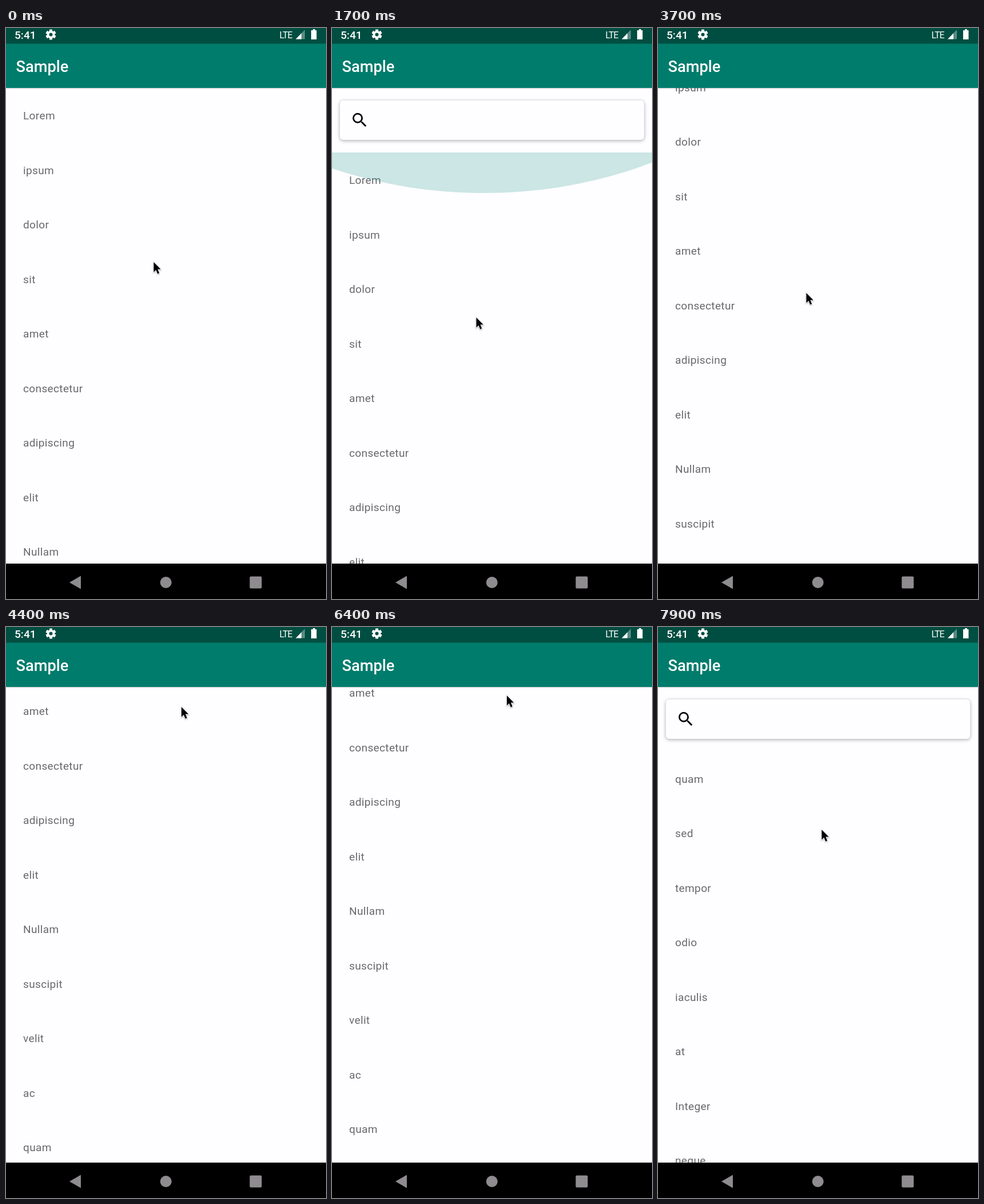
Recreate the animation shown at these times as an HTML page. Size 560x1000 px, loop 8 s.

```html
<!DOCTYPE html>
<html lang="en">
<head>
<meta charset="utf-8">
<title>Quick return search bar</title>
<style>
  html, body { margin: 0; height: 100%; overflow: hidden; background: #fefdff; }
  svg { display: block; width: 100vw; height: 100vh; font-family: Roboto, "Open Sans", sans-serif; }
  #list { font-size: 19.07px; letter-spacing: .34px; fill: #69686b; }
  .medium { font-weight: 500; fill: #fff; }
  #card rect { fill: #fefdff; filter: drop-shadow(0 2px 3px rgba(0,0,0,.22)) drop-shadow(0 0 1px rgba(0,0,0,.22)); }
  #bar { filter: drop-shadow(0 1px 1px rgba(0,0,0,.2)); }
  #cursor { filter: drop-shadow(0 1.5px 1.2px rgba(0,0,0,.35)); }
</style>
</head>
<body>
<svg viewBox="0 0 560 1000">
  <rect width="560" height="1000" fill="#fefdff"/>
  <g id="list"></g>
  <ellipse id="glow" cx="266" rx="672" fill="#008577"/>

  <!-- search header, slides out from under the toolbar -->
  <g id="header">
    <rect y="-200" width="560" height="418" fill="#fefdff"/>
    <g id="card">
      <rect x="13.5" y="126.5" width="533" height="69.5" rx="6"/>
      <path transform="translate(31.8 144.6) scale(1.385)" d="M15.5 14h-.79l-.28-.27A6.47 6.47 0 0 0 16 9.5 6.5 6.5 0 1 0 9.5 16c1.61 0 3.09-.59 4.23-1.57l.27.28v.79l5 4.99L20.49 19l-4.99-5zm-6 0a4.5 4.5 0 1 1 0-9 4.5 4.5 0 0 1 0 9z"/>
    </g>
  </g>

  <rect id="bar" width="560" height="105" fill="#007c6c"/>
  <text class="medium" x="17.5" y="77" font-size="27.24">Sample</text>

  <!-- status bar -->
  <rect width="560" height="27.5" fill="#004e41"/>
  <text class="medium" x="15" y="18.8" font-size="19.07">5:41</text>
  <g id="gear" transform="translate(78.5 11.5)" stroke="#fff" fill="none">
    <circle r="4.9" stroke-width="3.8"/>
  </g>
  <text x="478.5" y="17.5" font-size="16" letter-spacing="-1" fill="#fff">LTE</text>
  <path d="M507 19.5H523V3Z" fill="#fff" opacity=".35"/>
  <path d="M507 19.5H517V9.2Z" fill="#fff"/>
  <path d="M537 2h4v2h2.5v16h-9.500V4H537Z" fill="#fff"/>

  <!-- navigation bar -->
  <rect y="938" width="560" height="62" fill="#000"/>
  <g fill="#8f8c90">
    <path d="M111 971 131 959.5V982.500Z"/>
    <circle cx="279.800" cy="971" r="10"/>
    <rect x="426.500" y="960.500" width="21" height="21" rx="2"/>
  </g>

  <g id="cursor">
    <path d="M0 0V17.5L4 13.700 6.800 20.500 9.800 19.300 7 12.600H12.300Z" stroke="#fff" stroke-width="1.6" paint-order="stroke"/>
  </g>
</svg>
<script>
const LOOP = 8000, STEP = 100, HEADER = 113, ROW = 95.5;
const words = ("Lorem ipsum dolor sit amet consectetur adipiscing elit Nullam suscipit velit ac " +
  "quam sed tempor odio iaculis at Integer neque nunc vehicula").split(" ");
const $ = id => document.getElementById(id);

function add(parent, tag, attrs, text = "") {
  const node = document.createElementNS("http://www.w3.org/2000/svg", tag);
  for (const key in attrs) node.setAttribute(key, attrs[key]);
  node.textContent = text;
  $(parent).append(node);
}
words.forEach((word, i) => add("list", "text", { x: 30, y: 160.3 + ROW * i }, word));
for (let i = 0; i < 6; i++)
  add("gear", "path", { d: "M0-5.500V-9", "stroke-width": 5, transform: `rotate(${i * 60})` });

// time, x, y
const pointer = [
  [0, 258.5, 410], [500, 252, 487], [600, 252, 487], [1000, 255, 338], [1100, 255, 338],
  [1200, 254, 359], [1700, 252.5, 507], [2000, 249, 622], [2100, 249, 622], [2700, 246.3, 639],
  [2900, 246.3, 639], [3200, 250, 723], [3700, 259.5, 464], [3900, 275, 330], [4400, 307, 140],
  [4900, 307, 140], [5500, 301.5, 363], [5700, 300, 370], [6000, 300, 370], [6400, 306, 120],
  [6900, 306, 140], [7100, 306.3, 147], [7900, 286.5, 355]
];
// time, list offset, ease-out power
const drag = [
  [0, 0], [1200, 0], [1600, 113], [3200, 113], [3700, -145], [3900, -280], [4400, -388, 2],
  [4900, -388], [5500, -166], [5700, -160, 2], [6000, -160], [6400, -420], [6900, -1240.5, 2.5],
  [7100, -1240.5], [7900, -1033.5]
];

function progress(a, b, t, power = 1) {
  const k = Math.min(1, Math.max(0, (t - a) / (b - a)));
  return 1 - (1 - k) ** power;
}

function pointerAt(t) {
  const i = Math.max(1, pointer.findIndex(p => p[0] >= t));
  const a = pointer[i - 1], b = pointer[i], k = progress(a[0], b[0], t);
  return [a[1] + (b[1] - a[1]) * k, a[2] + (b[2] - a[2]) * k];
}

// The header takes up each movement first, between hidden and fully shown
function scrollAt(t) {
  let offset = 0, header = 0;
  for (let i = 1; i < drag.length && drag[i - 1][0] < t; i++) {
    const [start, from] = drag[i - 1], [end, to, power] = drag[i];
    const delta = (to - from) * progress(start, end, t, power);
    offset += delta;
    header = Math.min(HEADER, Math.max(0, header + delta));
  }
  return { offset, header };
}

// Overscroll glow grows with the pull and recedes on release
function glowAt(t) {
  if (t < 1600 || t > 2700) return 0;
  const pull = Math.max(1, (pointerAt(Math.min(t, 2100))[1] - 483) / .5185);
  return Math.max(0, 1 - 1 / (.7 * Math.sqrt(pull))) * (1 - progress(2100, 2650, t, 2));
}

function draw(now) {
  const t = Math.floor(now % LOOP / STEP) * STEP;
  const { offset, header } = scrollAt(t);
  const glow = glowAt(t);
  $("list").setAttribute("transform", `translate(0 ${offset})`);
  $("header").setAttribute("transform", `translate(0 ${header - HEADER})`);
  $("glow").setAttribute("cy", 105 + header - 582 * glow);
  $("glow").setAttribute("ry", 672 * glow);
  $("glow").setAttribute("opacity", .2 * Math.min(1, glow / .75));
  $("cursor").setAttribute("transform", `translate(${pointerAt(t)})`);
}

let start;
function tick(now) {
  start ??= now;
  draw(now - start);
  requestAnimationFrame(tick);
}
draw(0);
requestAnimationFrame(tick);
</script>
</body>
</html>
```
